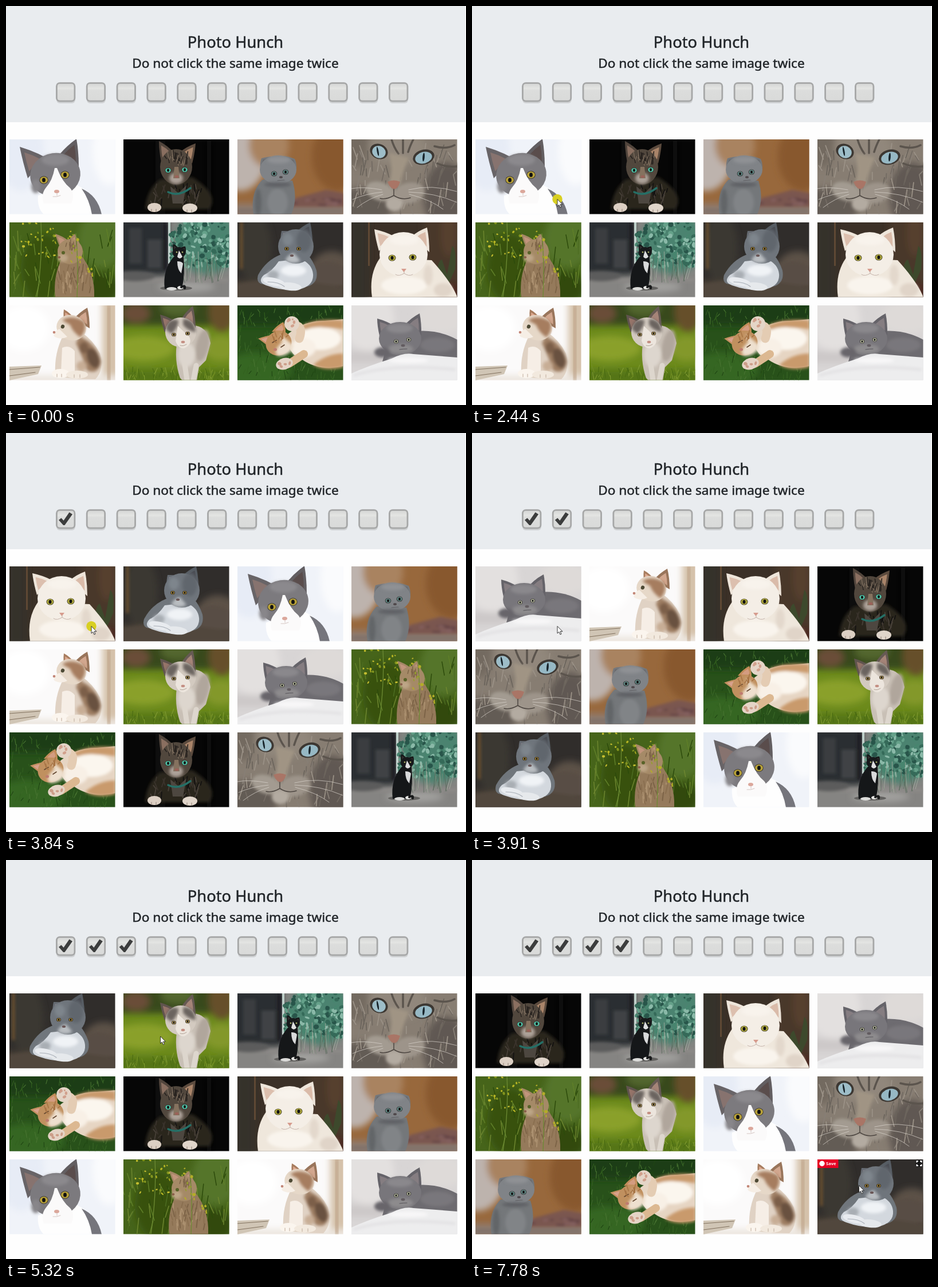
An HTML page for the animation above (8000 ms loop, 803x697 px).

```html
<!DOCTYPE html>
<html lang="en">
<head>
<meta charset="utf-8">
<title>Photo Hunch</title>
<style>
html, body { margin: 0; width: 100%; height: 100%; overflow: hidden; background: #fefefe; }
#stage { display: block; width: 803px; height: 697px; }
text { font-family: "Noto Sans", "Open Sans", sans-serif; fill: #212529; }
.head { font-weight: 500; text-anchor: middle; stroke: #212529; stroke-width: .5px; }
</style>
</head>
<body>
<svg id="stage" viewBox="0 0 803 697">
  <defs>
    <filter id="blur" x="-20%" y="-20%" width="140%" height="140%"><feGaussianBlur stdDeviation="6"/></filter>
    <filter id="fur" x="-5%" y="-5%" width="110%" height="110%"><feGaussianBlur stdDeviation=".7"/></filter>
    <filter id="shade" x="-20%" y="-20%" width="140%" height="140%"><feGaussianBlur stdDeviation="2.6"/></filter>
    <linearGradient id="key" x2="0" y2="1"><stop stop-color="#d3d4d3"/><stop offset=".3" stop-color="#e4e5e3"/><stop offset=".4" stop-color="#dcdddc"/><stop offset="1" stop-color="#d9dad9"/></linearGradient>
  </defs>
  <rect width="802" height="203" fill="#e9ecef"/>
  <text class="head" x="400.5" y="73" font-size="27.3">Photo Hunch</text>
  <text class="head" x="400.5" y="108" font-size="22.6">Do not click the same image twice</text>
  <g id="boxes"></g>
  <g id="grid"></g>
  <g id="hover">
    <rect width="36.5" height="15" fill="#e60023"/>
    <circle cx="8" cy="7.3" r="4.7" fill="#fff"/>
    <text x="15" y="10.3" font-size="7.6" font-weight="700" style="fill:#fff">Save</text>
    <rect x="171.5" y="1" width="12" height="12" rx="2.5" fill="#151515"/>
    <path d="M173.5 5.5V3H176M179 3H181.5V5.5M181.5 8.5V11H179M176 11H173.5V8.5" fill="none" stroke="#fff" stroke-width="2"/>
  </g>
  <circle id="spot" r="8.7" fill="#d8cf22"/>
  <path id="cursor" d="M0 0V12.5L2.9 9.9L4.9 14.5L7 13.6L5 9.2H9Z" fill="#fff" stroke="#222" stroke-width=".9"/>
</svg>
<script>
const $ = id => document.getElementById(id);

// Drawing helpers: each returns SVG markup
const oval = (x, y, rx, ry, fill, turn = 0) =>
  `<ellipse cx="${x}" cy="${y}" rx="${rx}" ry="${ry}" fill="${fill}" transform="rotate(${turn} ${x} ${y})"/>`;
const shape = (d, fill) => `<path d="${d}" fill="${fill}"/>`;
const line = (d, color, w = 1) => `<path d="${d}" fill="none" stroke="${color}" stroke-width="${w}" stroke-linecap="round"/>`;
const rect = (x, y, w, h, fill) => `<rect x="${x}" y="${y}" width="${w}" height="${h}" fill="${fill}"/>`;
const group = (name, ...parts) => `<g filter="url(#${name})">${parts.join('')}</g>`;
const back = (fill, ...parts) => rect(0, 0, 185, 131, fill) + group('blur', ...parts);
const fur = (...parts) => group('fur', ...parts);
const shade = (...parts) => group('shade', ...parts);
const eye = (x, y, r, color) => oval(x, y, r + .7, r * .9 + .4, '#2b2726') + oval(x, y, r, r * .85, color) +
  oval(x, y, r * .42, r * .55, '#111');
const eyes = (x1, y1, x2, y2, r, color) => eye(x1, y1, r, color) + eye(x2, y2, r, color);
const ear = (x1, y1, tx, ty, x2, y2, fill, inner) => {
  const cx = (x1 + x2 + tx) / 3, cy = (y1 + y2 + ty) / 3;
  const tri = k => {
    const p = (x, y) => `${cx + (x - cx) * k} ${cy + (y - cy) * k}`;
    return `M${p(x1, y1)}Q${p((x1 + tx) / 2 - 2, (y1 + ty) / 2 - 2)} ${p(tx, ty)}Q${p((x2 + tx) / 2 + 2, (y2 + ty) / 2 - 2)} ${p(x2, y2)}Z`;
  };
  return shape(tri(1), fill) + shape(tri(.6), inner);
};

let seed = 7;
const rnd = () => (seed = seed * 16807 % 2147483647) / 2147483647;
const blades = (n, x, y, w, h, dx, dy, colors, width) => Array.from({ length: n }, (_, i) =>
  line(`M${x + rnd() * w} ${y + rnd() * h}l${(rnd() - .5) * dx} ${-dy * (.4 + rnd())}`, colors[i % colors.length], width)).join('');
const dots = (n, x, y, w, h, r, colors) => Array.from({ length: n }, (_, i) =>
  oval(x + rnd() * w, y + rnd() * h, r * (.5 + rnd()), r * (.4 + rnd()), colors[i % colors.length], rnd() * 90)).join('');

const photos = {
  A: back('#f0f3f9', oval(20, 20, 40, 70, '#e7ecf6'), oval(175, 20, 30, 60, '#fafbfd')) + fur(
    shape('M50 98Q48 120 60 131H150Q146 92 118 80Z', '#fefefe'),
    shape('M126 86Q154 98 161 131H144Q140 106 126 86Z', '#75757c'),
    ear(32, 68, 18, 13, 64, 32, '#686467', '#87736f'), ear(86, 28, 117, -1, 121, 48, '#625e61', '#5a4d4c'),
    oval(80, 62, 44, 38, '#7c7a7e', -8), shade(oval(80, 36, 24, 10, '#8b898d'), oval(46, 82, 8, 12, '#88868a')),
    shape('M79 50Q75 72 64 84Q54 96 60 112H108Q115 96 106 85Q92 74 83 50Z', '#fbfafa'),
    eyes(60, 71, 97, 62, 7, '#b7a139'), oval(82.5, 91, 4.5, 3, '#dba79b'), line('M83 94V98M76 100Q83 101 89 98', '#c9b5b1', .8)),

  B: back('#060606', rect(60, 0, 9, 131, '#131313'), rect(145, 0, 9, 131, '#111')) + fur(
    shade(shape('M64 70Q40 88 38 122H150Q168 96 120 66Z', '#29251f')),
    blades(45, 50, 85, 85, 32, 12, 11, ['#453e36', '#151312', '#3a332c'], 2),
    shape('M82 82L96 94L110 80L104 112H86Z', '#4d4740'),
    ear(66, 40, 62, 3, 87, 22, '#51453c', '#8a6f60'), ear(99, 22, 126, 7, 120, 42, '#5c4b3e', '#a98469'),
    oval(92, 48, 28, 31, '#51473d'), blades(30, 72, 32, 40, 14, 8, 11, ['#26211e', '#776859'], 1.6),
    shade(oval(92, 68, 12, 10, '#aca198')), shape('M89 48H96L98 68H87Z', '#85725f'),
    eyes(78, 54, 107, 53, 4.8, '#4fbfa3'), oval(93, 65, 3.5, 2.3, '#9a6259'),
    line('M78 92Q96 101 117 85', '#256f66', 3.5), oval(54, 119, 12, 8, '#dccfc3'), oval(116, 120, 13, 8, '#e0d5ca'),
    line('M49 122v4M57 122v4M111 123v4M119 123v4', '#8a7b70')),

  C: back('#98683c', oval(5, 20, 48, 70, '#bdb3ad'), oval(55, 10, 35, 40, '#a98361'), oval(175, 30, 45, 60, '#88582f'),
      rect(-10, 112, 210, 30, '#8f7c70')) + shade(shape('M96 104L155 88L188 94V118H92Z', '#7a5650'), rect(0, 120, 185, 12, '#83736a'),
      blades(14, 100, 104, 80, 12, 40, 1, ['#876465', '#5f4144'], 3)) + fur(
    shape('M44 70Q22 92 28 131H94Q106 104 96 72Z', '#74777a'), shade(oval(70, 110, 18, 24, '#818487'), oval(36, 110, 6, 24, '#626568')),
    ear(40, 52, 42, 33, 62, 30, '#74777b', '#696b6f'), ear(80, 29, 100, 34, 103, 52, '#74777b', '#696b6f'),
    oval(71, 53, 32, 25, '#808387'), shade(oval(72, 36, 20, 6, '#8f9194'), oval(70, 79, 24, 4, '#5e6165')),
    eyes(64, 60, 84, 57, 4.6, '#5f8380'), oval(76, 66, 3, 2, '#50494c'), line('M70 72Q76 71 82 71', '#5f5f63')),

  D: back('#877d72', oval(20, 120, 50, 36, '#645c54'), oval(165, 100, 40, 60, '#605952'), oval(80, 15, 50, 30, '#91877b'), oval(8, 10, 22, 40, '#736a61')) + fur(
    blades(90, 0, 30, 185, 105, 18, 20, ['#6b645c', '#9a9186', '#736b63', '#877f76'], 1.8),
    line('M70 0Q74 14 82 25M90 0V24M108 0Q102 12 99 22M145 12Q165 18 180 10M150 42Q168 50 185 47', '#5b544d', 3.5),
    shade(shape('M66 24Q74 58 64 80H85Q90 54 100 32Z', '#a09484')),
    shade(oval(50, 91, 26, 16, '#a39b91', 18), oval(100, 94, 28, 18, '#9d948a', -12), oval(75, 113, 15, 12, '#b3aba1')),
    oval(48, 21, 16, 13, '#3c3732', 25), oval(126, 31, 19, 13, '#3c3732', -15),
    oval(48, 22, 12, 10.5, '#9dbdc8', 25), oval(126, 32, 15, 10, '#96b8c4', -15),
    oval(46, 21, 1.5, 8, '#17232a', -10), oval(126, 31, 1.8, 7.5, '#17232a', 5),
    shape('M63 74Q74 69 85 74Q81 87 74 87Q67 85 63 74Z', '#a97566'), line('M74 87V98Q60 106 50 103M74 98Q88 107 103 102', '#4e4742', 1.5),
    line('M53 88Q20 82 0 86M54 92Q24 95 2 105M55 96Q30 103 10 119M100 88Q140 78 184 91M100 92Q145 93 184 110M101 96Q138 105 160 122', '#dbd6ce', .7)),

  E: back('#46641a', oval(160, 30, 40, 50, '#55752a'), oval(60, 80, 40, 60, '#38510f'), oval(150, 115, 40, 30, '#314a10')) + fur(
    blades(70, 0, 40, 185, 100, 18, 26, ['#5f7f28', '#2c4a0b', '#4c6c21', '#6d862f'], 1.5),
    shape('M90 66Q76 96 80 131H148Q150 88 124 56Z', '#957a5b'),
    blades(40, 86, 82, 56, 45, 8, 11, ['#ac9170', '#7c6347', '#8a6f50'], 2),
    ear(89, 45, 80, 20, 103, 32, '#a58767', '#c1947c'), ear(103, 34, 114, 20, 126, 48, '#a58767', '#b9917a'),
    oval(106, 51, 22, 22, '#a58a67'), shade(oval(93, 62, 9, 7, '#bda687')), blades(12, 96, 37, 22, 12, 6, 9, ['#7c6347'], 1.5),
    oval(94, 53, 3, 3, '#596329'), oval(87, 61, 2.3, 2, '#8a5e4a'),
    line('M118 131Q121 75 116 20M48 131Q58 60 55 0', '#6c8a33', 1.3), dots(30, 20, 0, 65, 60, 2, ['#b5b423', '#82951f', '#c4bd30']),
    dots(14, 102, 15, 22, 55, 2, ['#b3ad29', '#94a128']), dots(8, 136, 78, 12, 22, 2, ['#b0ad28'])),

  F: back('#858482', rect(-10, -10, 88, 102, '#2b2e30'), oval(145, 35, 55, 55, '#4c8370'), oval(110, 112, 50, 10, '#a1a09e')) + fur(
    shade(rect(10, 10, 22, 62, '#3a3d3f'), rect(42, 30, 24, 50, '#3f4244'), rect(69, 0, 8, 84, '#1b1f20'), rect(0, 98, 185, 6, '#8c8987'), oval(20, 94, 36, 9, '#5b5c5b')),
    rect(78, 0, 4, 72, '#bfd0ca'),
    dots(190, 82, 0, 103, 78, 3.4, ['#65a18a', '#356a59', '#8ab9a8', '#48856f', '#28554a']),
    blades(30, 104, 98, 80, 8, 24, 36, ['#a8aea1', '#56685a', '#7c8c7c'], .8),
    oval(92, 115, 28, 4, '#62615f'),
    ear(87, 53, 87, 38, 96, 46, '#141617', '#302b2b'), ear(99, 46, 108, 42, 108, 57, '#141617', '#302b2b'),
    shape('M88 60Q68 82 72 116H102Q108 90 105 60Z', '#151719'), oval(97, 53, 11, 10, '#17191b'),
    shape('M97 49L94 60Q98 66 103 60Z', '#dededf'), shape('M94 68Q102 68 104 72L101 89Q94 83 94 68Z', '#d9dadb'),
    oval(84, 116, 9, 3, '#dcdcda'), oval(99, 114, 5, 3, '#e4e4e2'), line('M101 113Q108 109 107 115', '#171819', 4),
    oval(93, 52, 1.4, 1.3, '#abb068'), oval(103, 52, 1.4, 1.3, '#abb068')),

  G: back('#302d2b', oval(30, 45, 30, 60, '#3b3733'), oval(165, 95, 42, 45, '#5c5147'), rect(-10, 102, 210, 50, '#4c4339')) + fur(
    shade(shape('M125 78Q155 58 186 78V110H130Z', '#584e44'), shape('M0 108Q70 92 185 113V131H0Z', '#51473d'), line('M7 0V80', '#74552d', 4)),
    shape('M76 56Q50 66 36 92Q32 106 44 108L122 112Q142 106 138 84Q132 66 122 56Z', '#70767c'),
    shape('M72 68Q60 86 46 92Q34 104 50 110Q78 120 104 118Q134 112 132 90Q130 72 110 64Z', '#d3d8de'),
    shade(oval(98, 84, 22, 10, '#f0f3f6'), oval(62, 92, 10, 8, '#a9aeb4')),
    ear(76, 40, 77, 15, 100, 18, '#646970', '#89848a'), ear(104, 16, 127, 0, 131, 38, '#565c63', '#4a4c53'),
    oval(102, 42, 31, 30, '#6f757c'), shade(oval(116, 32, 13, 20, '#60666d'), oval(88, 30, 9, 11, '#7e858c')),
    shade(shape('M96 54Q84 60 84 67Q98 75 110 67Q104 60 99 54Z', '#b9bdc1')),
    eyes(86, 46, 107, 46, 3.2, '#977a33'), oval(95, 58, 3.2, 2, '#6a5656'), oval(64, 104, 20, 7, '#e8ebef', 14), oval(92, 112, 20, 7, '#e6e9ec', 6),
    line('M53 104Q72 104 82 112', '#a7adb6', 1.2)),

  H: back('#3b3027', rect(125, -10, 70, 150, '#4a3829'), rect(-5, -10, 35, 150, '#34302b'), oval(170, 20, 14, 40, '#573f2e'), oval(175, 125, 25, 20, '#4b2a22')) + fur(
    rect(29, 0, 3, 76, '#5f4834'), shape('M151 100Q148 68 158 65L167 91L176 41Q184 48 181 82L167 113Z', '#3d492c'),
    shape('M50 62Q30 90 36 131H185Q176 106 140 66Z', '#efe7dc'),
    ear(48, 50, 40, 12, 74, 24, '#eee5da', '#dcbfae'), ear(106, 24, 132, 9, 136, 52, '#eee5da', '#dabba9'),
    oval(91, 56, 42, 39, '#f4eee6'), shade(oval(92, 110, 40, 16, '#f9f4ed'), oval(134, 92, 8, 18, '#e3d8cc'), oval(160, 118, 16, 12, '#e0d4c8'), oval(92, 31, 25, 9, '#f8f3ec')),
    eyes(71, 62, 107, 61, 5.8, '#aca53c'), shape('M87 81H96L91.5 87Z', '#d69b8d'), line('M92 86V89Q83 95 77 91M92 89Q100 95 107 91', '#c5b3a9')),

  I: back('#fbfafa', rect(162, -20, 40, 170, '#d5c2ab'), oval(25, 40, 45, 40, '#fff'), rect(-10, 122, 210, 20, '#ece6df')) + fur(
    shade(rect(171, 0, 5, 131, '#bfa58b')), shape('M0 107L56 105L50 120L0 131Z', '#d0c5b5'), line('M0 112L53 108M0 123L45 117', '#82725f', 1.2),
    shape('M94 52Q78 83 80 119Q86 129 150 129Q166 112 158 84Q146 60 124 46Z', '#e0d2c4'),
    shade(shape('M122 54Q152 66 160 98Q156 122 136 114Q126 86 116 66Z', '#9d7d62'), oval(146, 92, 10, 18, '#69513f', -20), oval(130, 74, 8, 10, '#7c5e48'), oval(126, 106, 9, 9, '#c7ad95')),
    ear(96, 32, 95, 7, 112, 22, '#a77c5e', '#e0aa91'), ear(112, 24, 136, 4, 140, 40, '#99755b', '#d2a78f'),
    oval(108, 39, 26, 22, '#e6d8c8', 15), shade(shape('M92 26Q108 15 130 28Q136 42 124 56Q110 46 106 34Z', '#a67d5f')),
    shape('M87 41Q75 47 78 54Q88 61 101 55Z', '#f6eee5'), oval(93, 37, 3.2, 3.5, '#4e4a35', 20), oval(78, 47, 2.3, 2.2, '#c38778'),
    shape('M92 74Q105 68 114 80L114 117H90Z', '#f6eee6'), oval(89, 119, 15, 8, '#fbf5ee'), oval(118, 121, 19, 7, '#f2e9de'), line('M83 120v5M91 120v5M113 121v5M123 121v5', '#bdaa9a')),

  J: back('#6c8a1c', rect(-10, -20, 210, 55, '#39491a'), oval(22, 14, 24, 16, '#6b4e38'), oval(172, 12, 23, 34, '#66502c'), oval(95, 4, 30, 14, '#53662e'), oval(35, 75, 55, 22, '#8aa02c'), oval(170, 75, 30, 22, '#83982a'), rect(-10, 112, 210, 30, '#557413')) + fur(
    blades(80, 0, 116, 185, 24, 12, 12, ['#6f8c22', '#4b6c12', '#7f9a31'], 1.2),
    shape('M94 60Q88 96 99 127L103 131H128L132 108L144 96L152 66Q146 34 119 35Z', '#c9c0b6'), shade(oval(138, 70, 11, 28, '#b0a69c', 12)),
    shade(oval(110, 86, 15, 22, '#ddd6ce')),
    line('M107 103L111 131M127 105L122 131', '#ddd6cd', 9),
    ear(72, 47, 64, 16, 92, 29, '#60544e', '#967469'), ear(100, 25, 121, 1, 126, 39, '#665a54', '#a58478'),
    oval(100, 47, 27, 26, '#d3cac0'), shade(shape('M74 42Q76 21 96 26Q96 38 84 50ZM104 24Q125 23 126 47Q112 44 104 34Z', '#6b635f')),
    shape('M95 36L91 62Q95 75 106 75Q121 68 115 55Z', '#ece5dd'), eyes(88, 51, 112, 49, 3.3, '#a08850'), oval(104, 64, 3.3, 2.2, '#c48f83'), line('M99 70Q104 72 110 68', '#a08d80', .8)),

  K: back('#28511a', rect(-10, -10, 205, 45, '#1c3c12'), oval(35, 112, 60, 30, '#356621')) + fur(
    blades(200, 0, 10, 185, 125, 10, 10, ['#3a6727', '#1f4513', '#33601f', '#487431'], 1.1),
    shape('M84 54Q113 26 153 27L185 24V106Q143 116 112 94Q91 88 84 54Z', '#e6d5c3'),
    shade(shape('M112 36Q136 22 185 26V42Q148 34 122 46ZM132 104Q156 84 185 84V108Q152 116 132 104Z', '#c99a6c'), oval(143, 58, 38, 20, '#fbf6ee'), oval(115, 74, 22, 17, '#f8f0e6')),
    ear(52, 70, 36, 58, 60, 52, '#c49061', '#d8a18c'), ear(60, 46, 80, 29, 84, 47, '#c38c5a', '#d39c80'),
    oval(72, 66, 23, 21, '#c0905f', -30), shade(shape('M74 50L78 64Q61 80 70 88Q92 90 98 70Z', '#eee0cf')),
    line('M61 65L68 61M76 73L82 69', '#62452f', 1.6), oval(66, 77, 3, 2.5, '#bf7b6f'), blades(12, 63, 51, 24, 15, 8, 8, ['#a87546'], 1.6),
    line('M108 58Q116 36 99 34', '#e4ccb3', 15), oval(95, 32, 13, 13, '#e4d5c7'), dots(5, 85, 22, 18, 18, 2.5, ['#d1a18d']),
    line('M116 85L90 102', '#dcb891', 14), oval(82, 102, 15, 10, '#e5d4c6', -15), dots(5, 72, 96, 20, 11, 2.5, ['#cc9d88'])),

  L: back('#d8d5d5', oval(30, 25, 45, 55, '#e3e0df'), oval(155, 22, 45, 28, '#dedad8'), rect(-10, 80, 65, 20, '#ccc8c8')) + fur(
    shape('M105 46Q148 40 185 60V98H54L62 70Z', '#6d6b70'), shade(oval(150, 69, 30, 13, '#79777b')),
    ear(49, 53, 45, 23, 75, 36, '#656369', '#857d81'), ear(93, 34, 119, 14, 122, 52, '#656369', '#857d81'),
    oval(85, 58, 37, 29, '#78767b'), shade(oval(84, 40, 23, 8, '#8a888c'), oval(86, 76, 22, 8, '#8d8b8d'), oval(54, 82, 14, 9, '#67656b')),
    eyes(78, 63, 100, 60, 3.4, '#aeb29a'), oval(90, 70, 3.5, 2.3, '#625c60'), line('M84 77Q90 76 97 76', '#57555a'),
    shape('M0 119Q28 106 70 93Q91 82 108 85L185 91V131H0Z', '#ededee'), shade(line('M5 122Q70 101 180 112', '#e0dfe1', 4), oval(99, 96, 35, 5, '#f8f7f8')))
};

const slotX = i => 6 + i % 4 * 199;
const slotY = i => 233 + Math.floor(i / 4) * 145;

$('boxes').innerHTML = Array.from({ length: 12 }, (_, i) => `<g transform="translate(${87 + i * 52.82} 133)">
  <rect x="1" y="5" width="33" height="32" rx="6" fill="#cfd1d3"/>
  <rect x="1.4" y="1.7" width="31.5" height="31.5" rx="5.5" fill="url(#key)" stroke="#a6a7a7" stroke-width="2.8"/>
  <path class="tick" d="M5 19L9.5 15.5L13.5 20L23.5 5.5L29 9L15.5 28H13Z" fill="#3c3d3d"/></g>`).join('');
$('grid').innerHTML = Object.entries(photos).map(([k, art]) =>
  `<svg id="photo${k}" width="184.5" height="130.5" overflow="hidden">${art}</svg>`).join('');
const ticks = document.querySelectorAll('.tick');

// [start, photo order]; each round adds one tick
const rounds = [[0, 'ABCDEFGHIJKL'], [2520, 'HGACIJLEKBDF'], [3910, 'LIHBDCKJGEAF'], [5320, 'GJFDKBHCAEIL'], [6700, 'BFHLEJADCKIG']];
// [start, x, y, hovered slot or -1]
const moves = [[0, -50, -50, -1],
  [440, 735, 670, -1], [510, 712, 640, 11], [590, 640, 600, 11], [670, 520, 552, 10], [740, 410, 510, -1],
  [820, 320, 462, 5], [900, 245, 420, 5], [970, 182, 385, 4], [1050, 157, 350, -1], [1130, 149, 337.5, -1],
  [4770, 165, 333, -1], [4850, 206, 322, 1], [4920, 248, 312, 1], [5000, 269.5, 308, 1], [5320, 269.5, 308, -1],
  [5930, 290, 314, 1], [6010, 370, 326, 1], [6080, 470, 331, 2], [6160, 580, 326, 2],
  [6240, 700, 312, -1], [6310, 768, 300, -1], [6390, 700, 299, -1], [6470, 657, 302.5, -1],
  [7480, 658, 312, 3], [7560, 662, 350, 3], [7630, 666, 420, 7], [7700, 671, 490, 7], [7780, 675.5, 568.5, 11]];
const clicks = [[2440, 2520], [3840, 3910], [5150, 5320], [6640, 6700]];

const lastIndex = (list, t) => list.findLastIndex(row => row[0] <= t);
const place = (node, x, y) => node.setAttribute('transform', `translate(${x} ${y})`);
const show = (node, on) => node.style.display = on ? '' : 'none';
let round = -1;

function draw(t) {
  const now = lastIndex(rounds, t);
  if (now !== round) {
    round = now;
    [...rounds[now][1]].forEach((k, i) => {
      $('photo' + k).setAttribute('x', slotX(i));
      $('photo' + k).setAttribute('y', slotY(i));
    });
    ticks.forEach((tick, i) => show(tick, i < now));
  }
  const [, x, y, slot] = moves[lastIndex(moves, t)];
  place($('cursor'), x, y);
  place($('spot'), x, y);
  show($('spot'), clicks.some(([a, b]) => t >= a && t < b));
  show($('hover'), slot >= 0);
  if (slot >= 0) place($('hover'), slotX(slot), slotY(slot));
}

const start = performance.now();
function frame() {
  draw(Math.max(0, performance.now() - start) % 8000);
  requestAnimationFrame(frame);
}
frame();
</script>
</body>
</html>
```
